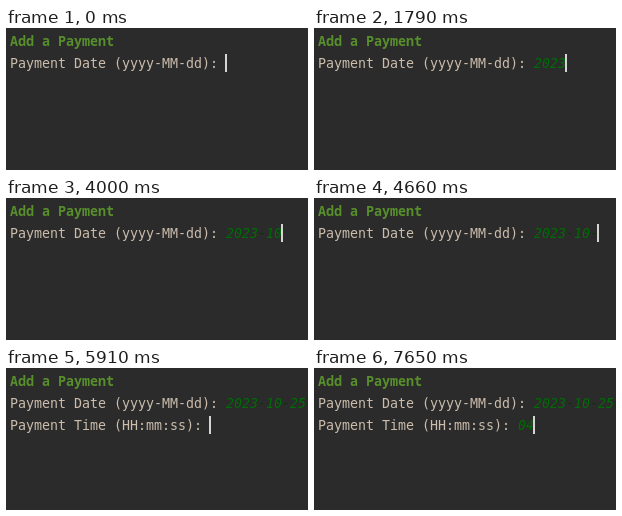
Recreate the animation shown at these times as an HTML page. Size 302x142 px, loop 8000 ms.

```html
<!DOCTYPE html>
<html lang="en">
<head>
<meta charset="utf-8">
<title>Console prompt</title>
<style>
  html, body { margin: 0; width: 100%; height: 100%; overflow: hidden; background: #2b2b2b; }
  .stage {
    position: relative; width: 302px; height: 142px; overflow: hidden;
    font: 13.29px/23px "DejaVu Sans Mono", monospace;
    font-variant-ligatures: none;
    color: #cbbcac;
  }
  .stage > * { position: absolute; left: 4px; white-space: pre; animation: 8s step-end infinite; }
  .title { top: 2px; color: #588f2d; font: bold 13.3333px/22px "Noto Sans Mono", monospace; }
  .row1 { top: 24px; }
  .row2 { top: 46px; }
  .stage > .input { overflow: hidden; height: 22px; color: #006c06; font-style: italic; }
  .input i { color: #0d330d; }
  .stage > .date { left: 220px; animation-name: date; }
  .stage > .time { left: 204px; animation-name: time; }
  .ask-time { animation-name: ask; }
  .stage > .caret {
    left: 219px; top: 26px; width: 2px; height: 18px;
    background: #d4d4d4; animation-name: caret;
  }

  /* One typed character is 8px wide; 1% is 80 ms. */
  @keyframes date {
    0% { width: 0; }
    9.125% { width: 8px; }
    14.125% { width: 16px; }
    18.25% { width: 24px; }
    22.375% { width: 32px; }
    32.375% { width: 40px; }
    46.625% { width: 48px; }
    50% { width: 56px; }
    58.25% { width: 64px; }
    62.375% { width: 72px; }
    65.625%, 100% { width: 82px; }
  }
  @keyframes time {
    0% { width: 0; }
    87.375% { width: 8px; }
    95.625%, 100% { width: 16px; }
  }
  @keyframes ask {
    0% { opacity: 0; }
    73.875%, 100% { opacity: 1; }
  }
  @keyframes caret {
    0% { opacity: 1; transform: none; }
    4.125% { opacity: 0; transform: none; }
    9.125% { opacity: 1; transform: translate(8px, 0); }
    14.125% { opacity: 1; transform: translate(16px, 0); }
    18.25% { opacity: 1; transform: translate(24px, 0); }
    22.375% { opacity: 1; transform: translate(32px, 0); }
    29% { opacity: 0; transform: translate(32px, 0); }
    32.375% { opacity: 1; transform: translate(40px, 0); }
    41.5% { opacity: 0; transform: translate(40px, 0); }
    46.625% { opacity: 1; transform: translate(48px, 0); }
    50% { opacity: 1; transform: translate(56px, 0); }
    58.25% { opacity: 1; transform: translate(64px, 0); }
    62.375% { opacity: 1; transform: translate(72px, 0); }
    65.625% { opacity: 1; transform: translate(80px, 0); }
    72.25% { opacity: 0; transform: translate(80px, 0); }
    73.875% { opacity: 1; transform: translate(-16px, 22px); }
    84.875% { opacity: 0; transform: translate(-16px, 22px); }
    87.375% { opacity: 1; transform: translate(-8px, 22px); }
    95.625%, 100% { opacity: 1; transform: translate(0, 22px); }
  }
</style>
</head>
<body>
<div class="stage">
  <div class="title">Add a Payment</div>
  <div class="row1">Payment Date (yyyy-MM-dd): </div>
  <div class="row1 input date">2023<i>-</i>10<i>-</i>25</div>
  <div class="row2 ask-time">Payment Time (HH:mm:ss): </div>
  <div class="row2 input time">04</div>
  <div class="caret"></div>
</div>
</body>
</html>
```
